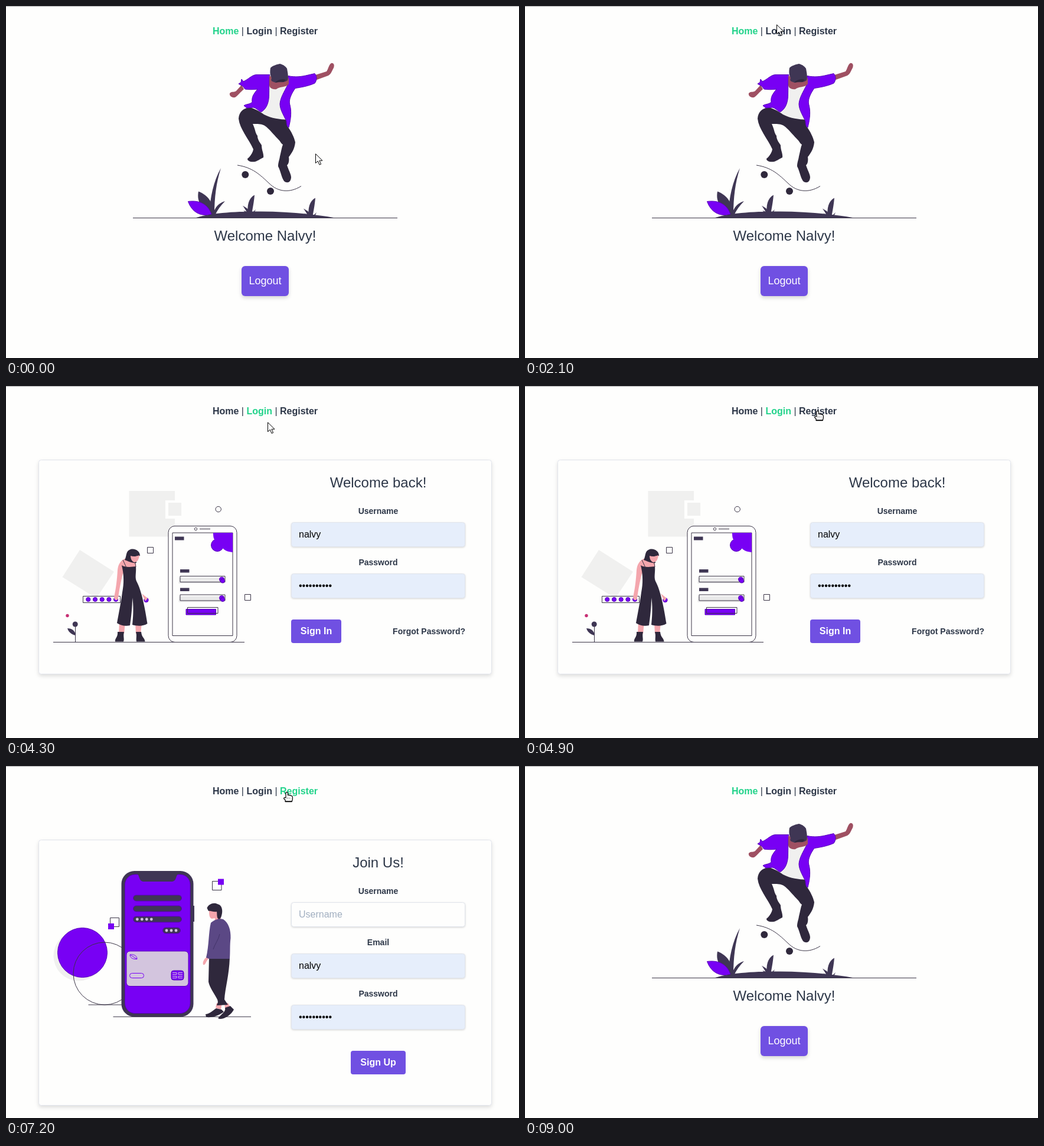
These frames come from a looping animation (869x597 px, 9.8 s). An HTML page:

```html
<!DOCTYPE html>
<html lang="en">
<head>
<meta charset="utf-8">
<title>Account pages</title>
<style>
html, body { margin: 0; width: 100%; height: 100%; overflow: hidden; background: #fefefd; }
svg { display: block; width: 869px; height: 597px; font: 16px "Liberation Sans", Arial, sans-serif; }
text { fill: #2d3748; }
.mid { text-anchor: middle; }
.bold { font-weight: bold; }
.h { font-size: 24px; }
.label { font-size: 14px; font-weight: bold; }
text.white { fill: #fff; }
.on { fill: #23d38b; }
.btn { fill: #7050e2; }
.card { fill: #fefefd; stroke: #e2e5ec; filter: drop-shadow(0 3px 3px rgba(0,0,0,.13)); }
.field { stroke: #e0e4ec; filter: drop-shadow(0 1px 1.5px rgba(0,0,0,.16)); }
.lift { filter: drop-shadow(0 3px 3px rgba(0,0,0,.16)); }
.ink { fill: #2f283c; }
.dark { fill: #3f3654; }
.pur { fill: #7800f4; }
.edge { stroke: #5800b8; stroke-width: 1; }
.pale { fill: #f0f0ef; }
.pink { fill: #f4a6ad; }
.tan { fill: #9f5062; }
.line { fill: none; stroke: #3b3547; stroke-width: 1; }
</style>
</head>
<body>
<svg viewBox="0 0 869 597" xmlns="http://www.w3.org/2000/svg">
<defs>
  <g id="tuft" class="dark">
    <path d="M410 354C408 338 411 326 421 320.500C420 333 418 342 416 354Z"/>
    <path d="M411 354L401 338.500C406 342 410 343 412 348ZM410 354L402 347L412 350ZM414 354L423 345L419 354Z"/>
  </g>
  <g id="entry">
    <path fill="#e9e9e9" d="M292.500 325H370V335H292.500Z"/>
    <path class="line" fill="none" d="M295 322.500H371V332.500H295Z"/>
    <path class="dark" d="M295 311H310.500V316.500H295Z"/>
    <g class="pur edge"><circle cx="365.500" cy="328" r="4"/><circle cx="367" cy="330.500" r="3.500"/></g>
  </g>
</defs>
<path d="M0 .5H869" stroke="#a9a9a9"/>

<text id="nav" class="mid" x="439" y="48"><tspan class="bold">Home</tspan> | <tspan class="bold">Login</tspan> | <tspan class="bold">Register</tspan></text>

<g id="loading"><text class="mid" x="439" y="102">Loading...</text></g>

<g id="home">
  <path class="dark" d="M322 359C350 350 395 348.500 432 348.500C475 348.500 520 353 555 359Z"/>
  <path class="dark" d="M344 354C346 325 351 298 364 275C356 300 353 325 353 354Z"/>
  <path class="dark" d="M326 314.500C343 321 352 335 351 353C335 347 322 335 326 314.500Z"/>
  <path class="dark" d="M350 355C354 340 361 334 371 331C364 338 358 346 354 355Z"/>
  <path class="pur edge" d="M308.500 331.500C328 329 342 336 348 353C330 358 315 350 308.500 331.500Z"/>
  <use href="#tuft"/><use href="#tuft" x="103" y="5"/>
  <path class="line" stroke-width="1.2" d="M215 359.500H663"/>
  <path class="line" stroke-width="1.2" d="M392 270C418 274 430 286 446 301C460 315 480 318 500 305.500"/>
  <g class="ink"><circle cx="405.300" cy="286" r="6"/><circle cx="448" cy="314" r="6"/></g>

  <path class="tan" d="M399 134L403 141C397 146 393 152 388 155C382 156 378 152 379 148C383 144 387 147 390 144Z"/>
  <path class="tan" d="M524 117L543 111C546 107 547 99 551 97C555 96 557 100 555 105C552 110 551 115 546 118L524 126Z"/>
  <path class="pale" d="M445 134C455 142 468 141 478 132C469 147 464 158 467 170L477 194C462 195 446 190 432 181C441 172 446 165 445 134Z"/>
  <path class="ink" d="M411 172C420 173 430 179 437 184C450 191 464 192 476 193C476 200 476 204 479 207C483 213 488 222 490 231C489 242 484 250 479 256C480 262 479 268 476 270C480 282 483 285 483 291C482 300 476 301 471 297C466 289 466 282 461 272C461 265 463 262 464 255C466 247 467 240 469 235C465 232 465 230 462 227C455 220 450 213 441 205C434 199 426 200 418 200C423 211 422 215 426 220C426 226 429 230 433 236C433 245 437 250 436 257C431 259 428 262 422 264C414 265 409 263 409 259C414 255 418 249 419 243C411 225 396 209 394 191C395 179 402 174 411 172Z"/>
  <path class="pur edge" d="M394 132L398 129.500L399 124L402 128C410 125 416 117 424 116.500L447 116.500C445 125 446 136 445.500 148C446 164 441 175 432 180C428 178 424 173 419 172L408 173L403 169C407 166 413 167 417 163C416 154 419 150 426 141C418 142 411 142 405 141L401 136Z"/>
  <path class="pur edge" d="M478 118.500C490 121 500 120 512 117L523 114.500C527 119 527 126 523 131C512 136 500 138 490 139.500C484 148 479 158 480.500 166C484 178 483 190 479 206C476 205 475 200 475 195C470 185 464 175 464 166C465 155 471 146 477 134Z"/>
  <path class="tan" d="M446 118L450 120C454 128 468 131 479 122L479 132C474 139 464 136 458 141C452 142 446 139 446 134Z"/>
  <path class="dark" d="M448 105C452 101 459 99 464 98C471 100 474 103 476 106C477 113 479 119 477 126C471 131 464 128 457 130C450 128 448 127 450 122C447 117 447 111 448 105Z"/>
  <path class="ink" d="M456 130C460 125 467 123 474 125L470 129C465 127 461 129 456 130Z"/>

  <text class="mid h" x="439" y="398">Welcome Nalvy!</text>
  <rect class="btn lift" x="399" y="441" width="80" height="51" rx="6"/>
  <text class="mid white" font-size="18" x="439" y="472">Logout</text>
</g>

<g id="login">
  <rect class="card" x="55.500" y="125.500" width="767" height="363" rx="4"/>
  <path class="pale" d="M208.500 178H286V255.500H208.500ZM125 278L183 315L153 360L95.500 324Z"/>
  <path fill="#fefefd" d="M270 194H301V225H270Z"/>
  <path class="pale" d="M275 198H297V220H275Z"/>
  <g class="line">
    <circle cx="359.700" cy="209" r="4.700"/>
    <path d="M239.500 273.500h10v10h-10ZM404.500 353.500h10v10h-10ZM130.500 356.500h63v11h-63Z"/>
    <rect x="275" y="237.500" width="116" height="197" rx="11" fill="#fefefd"/>
    <path d="M282 249H384V423.500H282ZM328 242.500H346M80 434.500H404"/>
    <circle cx="321.500" cy="242.500" r="2.200"/>
  </g>
  <g class="pur edge">
    <circle cx="358" cy="270" r="10.500"/>
    <path stroke="none" d="M351 249H384V282C375 281 371 279 367 275L355 263C351 259 351 254 351 249Z"/>
    <g id="beads"></g><circle cx="237.500" cy="363" r="3.700"/>
  </g>
  <path class="dark" d="M286 255.500H301.500V261.500H286Z"/>
  <use href="#entry"/><use href="#entry" y="31.500"/>
  <path class="pur edge" d="M305 378.500H355.500V388H305Z"/>
  <path class="line" d="M307.500 375.500H359V385.500H307.500Z"/>
  <path class="line" d="M117.500 404V434"/>
  <circle class="dark" cx="117.200" cy="404" r="4.500"/>
  <path class="dark" d="M104 411C112 411 117 415 118 423C110 421 106 417 104 411Z"/>
  <circle cx="104" cy="389.500" r="2.700" fill="#c72f73"/>

  <path class="pink" d="M192 400H202L200 420H191ZM219 402H230L228 420H220ZM230 352L240 360L236 365Z"/>
  <path class="pink" d="M205 292C194 294 190 303 189 312C188 330 186 345 183 358C183 364 189 365 190 360C192 345 194 334 198 318L220 308C221 300 220 297 215 295Z"/>
  <path class="ink" d="M196 304C202 308 212 307 220 306C221 316 218 324 221 331C230 347 236 380 239.500 403C232 408 222 407 214 405C216 385 216 372 214 359C214 375 212 392 210 406C202 408 194 406 188 402C192 380 195 365 197 350C200 335 200 320 196 304Z"/>
  <path class="line" stroke-width="1.300" d="M198 295L204 308M218 296L220 307"/>
  <path class="ink" d="M201 295C205 289 202 280 211 277C220 275 227 281 227 288L219 289L221 300C214 301 207 297 201 295Z"/>
  <path class="pink" d="M211 288C216 290 221 289 226 287C225 294 223 299 217 299C213 297 211 293 211 288Z"/>
  <path class="ink" d="M189 417H200C198 425 201 429 199 433.500H185C184 428 190 426 189 417ZM220 417H229C230 427 235 427 235.500 433.500H221C220 428 222 424 220 417Z"/>

  <text class="mid h" x="630.500" y="172">Welcome back!</text>
  <g id="loginForm"></g>
  <rect class="btn" x="483" y="396" width="85" height="40" rx="4"/>
  <text class="mid bold white" x="525.500" y="421">Sign In</text>
  <text class="label" text-anchor="end" x="778" y="421">Forgot Password?</text>
</g>

<g id="register">
  <rect class="card" x="55.500" y="125.500" width="767" height="450" rx="4"/>
  <circle class="pale" cx="123" cy="322" r="42.500"/>
  <circle class="pur edge" cx="129.500" cy="316.500" r="42"/>
  <g class="line">
    <circle cx="167" cy="352" r="53"/>
    <path d="M139.500 405H197M181.500 425.300H415M176.500 257.500h15v15h-15ZM349.500 195.500h15.500v15h-15.500Z"/>
  </g>
  <path class="pur" d="M173 267h10v10h-10ZM359 191.500h10v10h-10Z"/>
  <rect class="dark" x="314" y="237" width="5" height="27"/>
  <rect class="dark" x="195.500" y="178" width="122" height="247.500" rx="22"/>
  <rect class="pur edge" x="201.500" y="184" width="110.500" height="235.500" rx="17"/>
  <path class="dark" d="M222 183H292C287 185 290 196 280 196H234C224 196 227 185 222 183Z"/>
  <g class="dark edge">
    <rect x="215.500" y="219" width="82" height="10" rx="5"/>
    <rect x="215.500" y="237" width="82" height="10" rx="5"/>
    <rect x="215.500" y="255" width="82" height="10" rx="5"/>
    <rect x="265.500" y="274" width="30" height="10" rx="5"/>
  </g>
  <g id="pips" fill="#d3c5de"></g>
  <rect class="edge" x="204" y="314" width="105" height="59.500" rx="6" fill="#d3c5de"/>
  <g fill="none" stroke="#7800f4">
    <path d="M210 320C217 319 222 322 222 327.500C214 328 210 325 210 320ZL222 327.500"/>
    <rect x="209.500" y="351.500" width="24" height="8" rx="4"/>
  </g>
  <rect class="pur edge" x="280" y="347" width="21" height="16" rx="4"/>
  <path fill="none" stroke="#d3c5de" d="M282 350.500h7v3h-7m0 3h7v3h-7M299 350.500h-7v3h7m0 3h-7v3h7"/>

  <path class="pink" d="M340 324C334 328 332 336 335 337.500C339 336 338 332 343 327ZM357 402H366L364 413L355 410ZM370 402H376L380 409L371 411Z"/>
  <path class="pink" d="M344 243C344 252 344 258 349 259L354 258L353 265L364 262L363 243Z"/>
  <path class="ink" d="M340.500 241C343 234 352 231 358 234C367 236 368 247 364 257L361 261C356 257 358 252 357 247C351 248 346 245 343 246Z"/>
  <path class="ink" d="M344 325H379C378 355 371 378 370 396L376 405L357 406C358 402 360 402 358 396C353 386 345 376 343 366Z"/>
  <path class="ink" d="M338 421C346 420 351 414 356 411L365 413L369 417C360 423 352 427 339 426ZM359 428C364 421 373 417 371 410L380 407L386 413C382 421 372 429 362 429Z"/>
  <path fill="#5b4885" d="M347 266C353 261 361 258 368 260C377 266 381 278 380.500 292C379 304 380 314 379 327L344 327L339 325C344 305 343 282 347 266Z"/>
  <path d="M362 285C360 295 353 303 351 311" fill="none" stroke="#43346a"/>

  <text class="mid h" x="630.500" y="172">Join Us!</text>
  <g id="registerForm"></g>
  <rect class="btn" x="584" y="483" width="93" height="40" rx="4"/>
  <text class="mid bold white" x="630.500" y="508">Sign Up</text>
</g>

<g id="cursor" stroke="#000" fill="#fff" stroke-linejoin="round">
  <path id="arrow" d="M.5 .8V16.500L4.300 13L7 19.300L9.600 18.200L6.900 12.200H12Z"/>
  <g id="hand" stroke-width="1.200">
    <path d="M-2 10V2Q-2 .3 -.2 .3Q1.500 .3 1.500 2V5.500Q3 4.600 4.200 6Q6 5.200 7 6.600Q9.400 6.400 9.400 9V12L8.300 16.300H-3V13.500L-5.300 11.500Q-5.500 8.500 -2 10Z"/>
    <path d="M-3 16.300H8.300" stroke-width="1.800"/>
    <path d="M0 10.500H6.500" stroke-dasharray="1 2" fill="none"/>
  </g>
</g>
</svg>
<script>
const $ = id => document.getElementById(id);
const show = (el, on) => el.setAttribute("display", on ? "inline" : "none");
const LOOP = 9800, STEP = 100;
const STARS = "*".repeat(18), DOTS = "•".repeat(10);

const dots = (x, y, gap, n, r) => Array.from({ length: n },
  (_, i) => `<circle cx="${x + i * gap}" cy="${y}" r="${r}"/>`).join("");
$("beads").innerHTML = dots(139.3, 362, 11.7, 5, 3.6);
$("pips").innerHTML = dots(222.3, 260, 8, 4, 2.4) + dots(272, 279, 8, 3, 2.4);

// Each row is [label, placeholder, autofilled value]
const forms = {
  login: [["Username", "Username", "nalvy"], ["Password", STARS, DOTS]],
  register: [["Username", "Username", ""], ["Email", "Email", "nalvy"], ["Password", STARS, DOTS]]
};

function drawForm(name, filled) {
  $(name + "Form").innerHTML = forms[name].map(([label, hint, value], i) => {
    const y = 231 + 87 * i, full = filled && value;
    return `<text class="mid label" x="630.5" y="${y - 14}">${label}</text>
      <rect class="field" x="483.5" y="${y + .5}" width="294" height="41" rx="4" fill="${full ? "#e6eefb" : "#fefefd"}"/>
      <text x="496" y="${y + 26}" style="fill:${full ? "#000" : "#a0aec0"}">${full ? value : hint}</text>`;
  }).join("");
}

// Pages: [start, name, highlighted link, autofilled]
const pages = [
  [0, "home", 0], [2800, "login", 1, false], [2900, "login", 1, true],
  [5800, "register", 2, false], [5900, "register", 2, true],
  [8300, "loading", 0], [8400, "home", 0]
];

// Pointer moves: [start, steps, x, y, dip]
const moves = [
  [100, 2, 755, 264], [600, 4, 656, 205], [1200, 9, 427, 29], [2100, 1, 426, 31],
  [2200, 2, 432, 41], [2600, 1, 434, 39], [4300, 7, 496, 42, 50],
  [7200, 6, 374, 42, 4], [8600, 4, 147, 18]
];
const links = [[350, 394], [407, 451], [464, 528]];

function pointer(t) {
  let x = 524, y = 250;
  for (const [start, steps, toX, toY, dip = 0] of moves) {
    if (t < start) break;
    const p = Math.min(1, (Math.floor((t - start) / STEP) + 1) / steps);
    x += (toX - x) * p;
    y += (toY - y) * p + dip * Math.sin(Math.PI * p);
  }
  return [Math.round(x), Math.round(y)];
}

let current = null;
function setPage(page) {
  if (page === current) return;
  current = page;
  const [, name, link, filled] = page;
  for (const id of ["home", "login", "register", "loading"]) show($(id), id === name);
  [...$("nav").children].forEach((el, i) => el.classList.toggle("on", i === link));
  if (forms[name]) drawForm(name, filled);
}

function render(t) {
  setPage(pages.filter(p => p[0] <= t).pop());
  const [x, y] = pointer(t);
  const over = y > 33 && y < 52 && links.some(([a, b]) => x >= a && x <= b);
  $("cursor").setAttribute("transform", `translate(${x} ${y})`);
  show($("cursor"), t < 9000);
  show($("hand"), over);
  show($("arrow"), !over);
}

function tick() {
  render(performance.now() % LOOP);
  requestAnimationFrame(tick);
}
tick();
</script>
</body>
</html>
```
